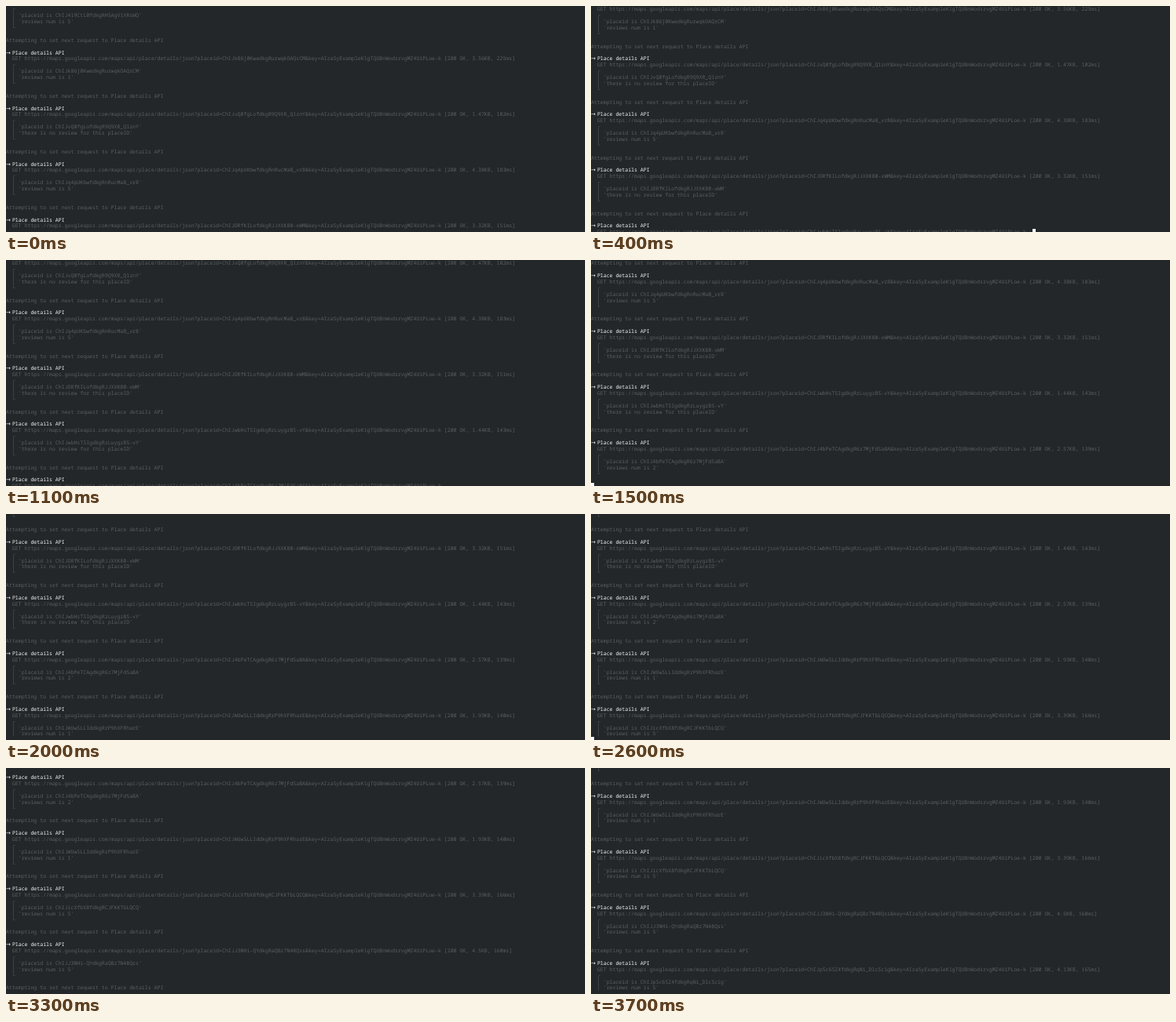
These frames come from a looping animation (737x288 px, 3800 ms). An HTML page:

```html
<!DOCTYPE html>
<html lang="en">
<head>
<meta charset="utf-8">
<title>Terminal log</title>
<style>
  html, body { margin: 0; width: 100%; height: 100%; overflow: hidden; background: #232729; }
  #log {
    padding-top: 0.3px;
    font: 6.567px "Noto Sans Mono", monospace;
    text-rendering: geometricPrecision;
    color: #5b5f61;
  }
  #log div { height: 7.9px; line-height: 7.9px; white-space: pre; }
  #log b { color: #f4f5f5; font-weight: 500; }
  #log i { display: inline-block; width: 7.88px; font: normal 7px/0 "DejaVu Sans", sans-serif; }
  #log u { display: inline-block; width: 4px; height: 8px; background: #fcfcfc; vertical-align: top; }
</style>
</head>
<body>
<div id="log"></div>
<script>
const LOOP = 3800, ROWS = 37, BLOCK = 9;
const KEY = 'AIzaSyExampleK1gTQUBnWodsrvgMZ4UiPLoe-k';
const NONE = 'there is no review for this placeID';
const count = n => `reviews num is ${n}`;

// place id, response size, duration, result
const requests = [
  ['ChIJ419CtL0fdkgRHSAgV1XRsWQ', '3.41KB', 160, count(5)],
  ['ChIJk86j0KwedkgRurwqkOAQsCM', '3.56KB', 225, count(1)],
  ['ChIJvQ0fgLofdkgR9Q9XR_Q1znY', '1.47KB', 102, NONE],
  ['ChIJq4pUKbwfdkgRnRucMaB_vr8', '4.38KB', 183, count(5)],
  ['ChIJDRfKILofdkgRJJXXK80-xWM', '3.32KB', 151, NONE],
  ['ChIJwbHsTSIgdkgRzLuygzBS-vY', '1.44KB', 143, NONE],
  ['ChIJ4bPeTCAgdkgR6z7MjFdSaBA', '2.57KB', 139, count(2)],
  ['ChIJWUwSLLIddkgRrP9hXFRharE', '1.93KB', 140, count(1)],
  ['ChIJicXfbX8fdkgRCJFKKTbLQCQ', '3.39KB', 166, count(5)],
  ['ChIJJ3NHi-QYdkgRaQBz7N48Qss', '4.5KB', 160, count(5)],
  ['ChIJpSc6SZ4fdkgRqNi_DlcScig', '4.13KB', 165, count(5)],
];

const getLine = id =>
  `  GET https://maps.googleapis.com/maps/api/place/details/json?placeid=${id}&amp;key=${KEY} `;

const lines = requests.flatMap(([id, size, ms, result]) => [
  '<b><i>→</i>Place details API</b>',
  `${getLine(id)}[200 OK, ${size}, ${ms}ms]`,
  '  ┌',
  `  │ 'placeid is ${id}'`,
  `  │ '${result}'`,
  '  └',
  '',
  'Attempting to set next request to Place details API',
  '',
]);

// line being written in each 100 ms slot
const steps = [
  38, 41, 42, 44, 46, 47, 50, 50, 50, 51, 53, 55, 56,
  59, 60, 61, 62, 63, 64, 65, 68, 69, 71, 71, 73, 74,
  77, 80, 82, 83, 86, 87, 88, 89, 90, 91, 92, 95,
];

const log = document.getElementById('log');
let shown = '';

function draw() {
  const t = performance.now() % LOOP;
  const last = steps[Math.floor(t / 100)];
  const phase = t % 1200;
  const cursor = phase >= 200 && phase < 500 ? '<u></u>' : '';
  const state = last + cursor;
  if (state !== shown) {
    shown = state;
    const pending = last % BLOCK === 1 ? getLine(requests[(last - 1) / BLOCK][0]) + ' ' : '';
    const view = [...lines.slice(last - ROWS + 1, last), pending + cursor];
    log.innerHTML = view.map(line => `<div>${line}</div>`).join('');
  }
  requestAnimationFrame(draw);
}
draw();
</script>
</body>
</html>
```
